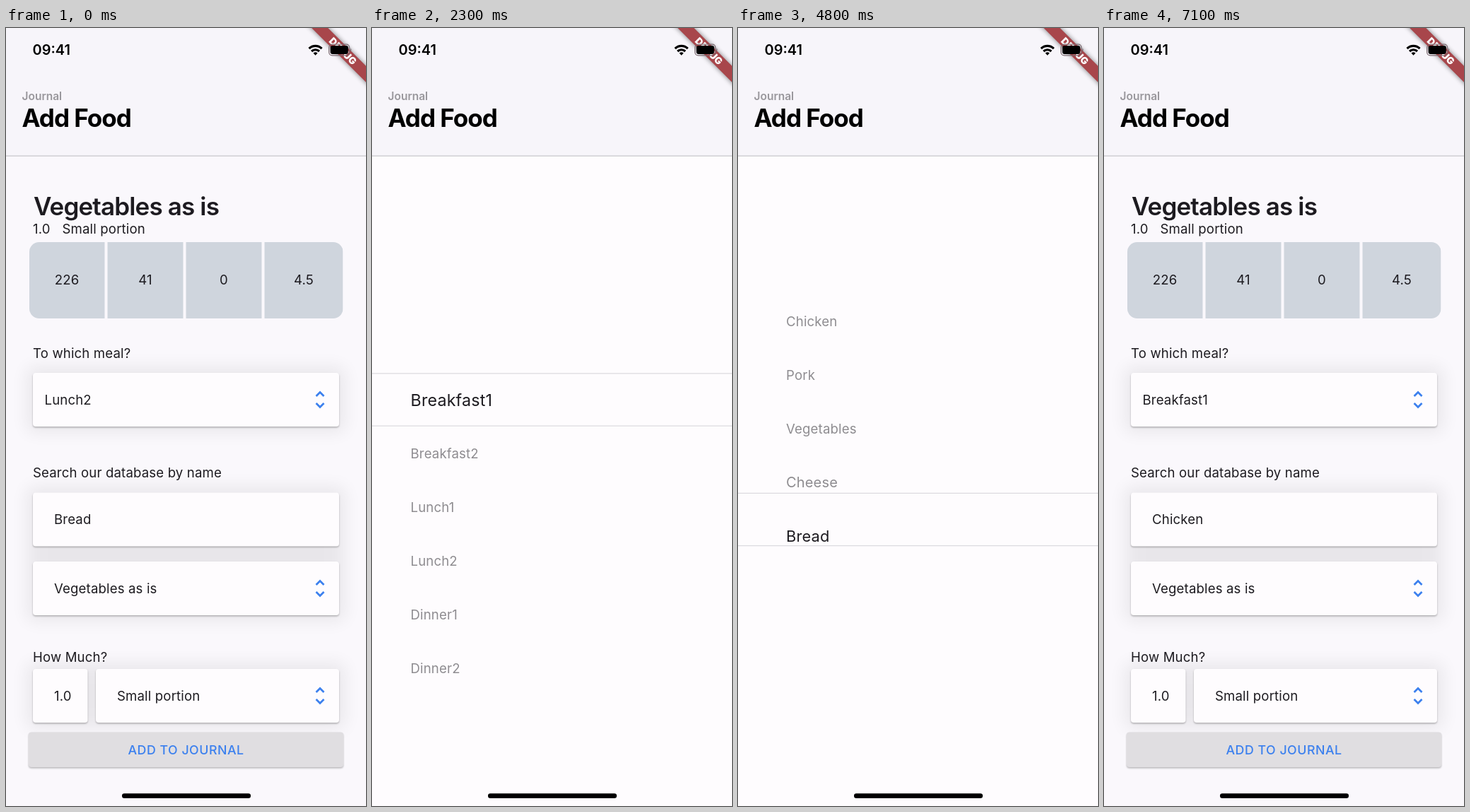
An HTML page that plays this animation: 509x1101 px, repeating every 7.2 s.

```html
<!DOCTYPE html>
<html lang="en">
<head>
<meta charset="utf-8">
<title>Add Food</title>
<style>
  html, body { margin: 0; width: 100%; height: 100%; overflow: hidden; background: #faf8fc; }
  svg { display: block; width: 100%; height: 100%; }
  text { font-family: Inter, Roboto, sans-serif; font-size: 18.6px; letter-spacing: .15px; fill: #1d1b20; }
  .mid { text-anchor: middle; }
  .title { font-size: 35px; font-weight: 600; letter-spacing: -.85px; }
  .head { font-size: 35px; font-weight: 700; letter-spacing: -1px; fill: #000; }
  .sub { font-size: 15.5px; font-weight: 600; letter-spacing: 0; fill: #99979c; }
  .clock { font-size: 20px; font-weight: 600; letter-spacing: 0; fill: #000; }
  .action { font-size: 17.8px; font-weight: 500; letter-spacing: .5px; fill: #3c80ee; text-anchor: middle; }
  .banner { font-size: 13.8px; font-weight: 900; letter-spacing: 0; fill: #fff; text-anchor: middle; }
  .card { fill: #fefcfe; }
  .chevron { fill: none; stroke: #3c80ee; stroke-width: 2.7; }
  .rule { stroke: #dcdbdf; stroke-width: 1.3; }
</style>
</head>
<body>
<svg id="stage" viewBox="0 0 509 1101" xmlns="http://www.w3.org/2000/svg">
  <defs>
    <filter id="soft" x="-20%" y="-60%" width="140%" height="220%"><feGaussianBlur stdDeviation="12"/></filter>
    <filter id="edge" x="-5%" y="-20%" width="110%" height="140%"><feGaussianBlur stdDeviation="1.3"/></filter>
    <filter id="ribbon" x="-20%" y="-100%" width="140%" height="300%"><feGaussianBlur stdDeviation="3.6"/></filter>
    <clipPath id="tiles"><rect x="33" y="303" width="443.5" height="108" rx="14"/></clipPath>
  </defs>
  <g id="page"></g>
  <g id="picker"></g>
  <g id="chrome"></g>
</svg>
<script>
const LOOP = 7200, ROW = 76, ZOOM = 0.25;
const $ = id => document.getElementById(id);
const clamp = v => Math.max(0, Math.min(1, v));
const ramp = (t, a, b) => clamp((t - a) / (b - a));

// y is the centre of the capitals
const CAP = { title: 12.7, head: 12.7, sub: 5.7, clock: 7.3, action: 6.5, banner: 5 };
const text = (x, y, s, cls = '') =>
  `<text x="${x}" y="${y + (CAP[cls] || 6.7)}" class="${cls}">${s}</text>`;
const rect = (x, y, w, h, attrs) =>
  `<rect x="${x}" y="${y}" width="${w}" height="${h}" ${attrs}/>`;
const glow = (y, h) => rect(30, y - 8, 449, h + 16, 'rx="6" fill="#000" opacity=".068" filter="url(#soft)"');
const raised = (x, y, w, h, face) =>
  rect(x, y + 1.5, w, h, 'rx="4" fill="#000" opacity=".27" filter="url(#edge)"') +
  rect(x, y, w, h, `rx="4" ${face}`);
const card = (x, y, w) => raised(x, y, w, 76, 'class="card"');
const chevrons = y =>
  `<path class="chevron" d="M438.5 ${y - 5}l5.5-5.5 5.5 5.5M438.5 ${y + 5}l5.5 5.5 5.5-5.5"/>`;

const tiles = [[33, 106.5, 86, '226'], [143.5, 107, 197, '41'], [254.5, 107, 308, '0'], [365.5, 111, 421, '4.5']];

$('page').innerHTML =
  rect(0, 0, 509, 1101, 'fill="#faf8fc"') +
  glow(488, 76) + glow(657.5, 173.5) + glow(907, 76) +
  text(39, 252, 'Vegetables as is', 'title') +
  text(38, 284, '1.0') + text(79.5, 284, 'Small portion') +
  rect(33, 303, 443.5, 108, 'rx="14" fill="#faf8fc"') +
  '<g clip-path="url(#tiles)">' + tiles.map(([x, w]) => rect(x, 303, w, 108, 'fill="#cfd5dd"')).join('') + '</g>' +
  tiles.map(([, , cx, s]) => text(cx, 356.5, s, 'mid')).join('') +
  text(38, 460, 'To which meal?') + card(38, 488, 433) + chevrons(526) +
  text(38, 629.5, 'Search our database by name') + card(38, 657.5, 433) +
  card(38, 755, 433) + text(68, 793, 'Vegetables as is') + chevrons(793) +
  text(38, 890, 'How Much?') +
  card(38, 907, 77.5) + text(68, 945, '1.0') +
  card(127, 907, 344) + text(157, 945, 'Small portion') + chevrons(945) +
  raised(32, 996.5, 445, 49.5, 'fill="#e0dee1"') +
  text(254.5, 1021, 'ADD TO JOURNAL', 'action') +
  '<text id="meal"></text><text id="food"></text>';

$('chrome').innerHTML =
  rect(0, 0, 509, 181, 'fill="#f7f5fa"') +
  rect(0, 180.4, 509, 1.3, 'fill="#cbc9cd"') +
  text(37.5, 31, '09:41', 'clock') +
  text(22.5, 96.5, 'Journal', 'sub') +
  text(22.5, 127.3, 'Add Food', 'head') +
  '<g transform="translate(509 0) rotate(45)">' +
    rect(-70, 38, 140, 16.3, 'fill="#000" opacity=".5" filter="url(#ribbon)"') +
    rect(-70, 38, 140, 16.3, 'fill="#a8464b"') +
    text(0, 46.2, 'DEBUG', 'banner') + '</g>' +
  '<g fill="none" stroke="#000" stroke-width="3.2">' +
    '<path d="M428.5 29.2a12.6 12.6 0 0 1 18 0M432 33a7.8 7.8 0 0 1 11 0"/></g>' +
  '<path d="M437.5 38.8l-3-3.2a4.4 4.4 0 0 1 6 0z"/>' +
  rect(456.7, 23.2, 29, 15.6, 'rx="4.5" fill="none" stroke="#77656c" stroke-width="1.2"') +
  rect(458.6, 25.1, 25.2, 11.8, 'rx="2.8"') +
  '<path d="M487.2 28.5q2.2 2.5 0 5z" fill="#77656c"/>' +
  rect(164, 1083.3, 182, 6.7, 'rx="3.3"');

// drag: [time, pixels]; the last stretch settles with an ease-out
const pickers = [
  { field: $('meal'), x: 54.5, y: 526, items: ['Breakfast1', 'Breakfast2', 'Lunch1', 'Lunch2', 'Dinner1', 'Dinner2'],
    first: 3, grow: [800, 1080], show: [1080, 1380], hide: [2950, 3250], shrink: [3200, 3400],
    drag: [[1700, 0], [2100, 185], [2300, 228]] },
  { field: $('food'), x: 68, y: 695.5, items: ['Chicken', 'Pork', 'Vegetables', 'Cheese', 'Bread'],
    first: 4, grow: [3650, 3950], show: [3980, 4280], hide: [6150, 6450], shrink: [6400, 6600],
    drag: [[4700, 0], [4800, 23], [5600, 263], [6000, 304]] }
];

$('picker').innerHTML = pickers.map(() => '<g></g>').join('');
pickers.forEach((p, i) => {
  p.layer = $('picker').children[i];
  p.layer.innerHTML = rect(0, 181, 509, 920, 'fill="#fefcfe"') +
    [-37.2, 37.2].map(d => `<path class="rule" d="M0 ${p.y + d}H509"/>`).join('') +
    p.items.map(s => `<text>${s}</text>`).join('');
  p.rows = [...p.layer.querySelectorAll('text')];
});

function dragged(keys, t) {
  if (t <= keys[0][0]) return 0;
  for (let i = 1; i < keys.length; i++) {
    const [a, from] = keys[i - 1], [b, to] = keys[i];
    if (t < b) {
      const u = (t - a) / (b - a);
      return from + (to - from) * (i === keys.length - 1 ? u * (2 - u) : u);
    }
  }
  return keys[keys.length - 1][1];
}

function place(el, x, y, focus) {
  el.setAttribute('transform', `translate(${x} ${y + 6.7 + 2.6 * focus}) scale(${1 + ZOOM * focus})`);
}

function draw(t) {
  for (const p of pickers) {
    const offset = dragged(p.drag, t) - p.first * ROW;
    const chosen = Math.round(-offset / ROW);
    const shown = ramp(t, ...p.show) - ramp(t, ...p.hide);
    p.layer.setAttribute('opacity', shown);
    p.layer.setAttribute('display', shown > 0 ? 'inline' : 'none');
    p.rows.forEach((row, i) => {
      const d = offset + i * ROW;
      place(row, p.x, p.y + d, clamp(1 - Math.abs(d) / ROW));
      row.style.fill = i === chosen ? '#1d1b20' : '#8e8c90';
    });
    p.field.textContent = p.items[chosen];
    place(p.field, p.x, p.y, ramp(t, ...p.grow) - ramp(t, ...p.shrink));
  }
}

const start = performance.now();
function tick() {
  draw((performance.now() - start) % LOOP);
  requestAnimationFrame(tick);
}
tick();
</script>
</body>
</html>
```
